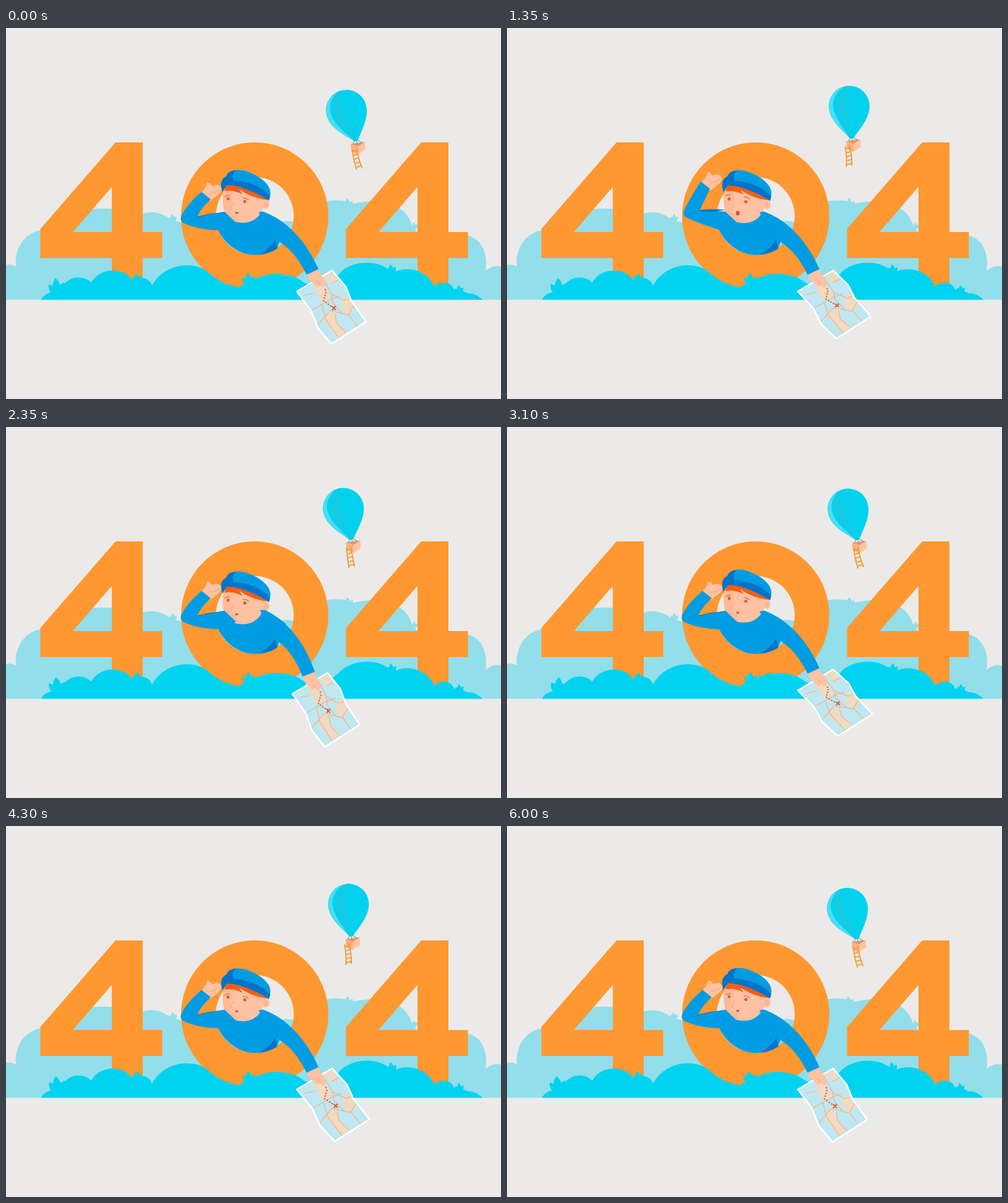
Recreate the animation shown at these times as an HTML page. Size 800 by 600 pixels, loop 6100 ms.

```html
<!DOCTYPE html>
<html lang="en">
<head>
<meta charset="utf-8">
<title>404</title>
<style>
  html, body { margin: 0; width: 100%; height: 100%; overflow: hidden; background: #ebeae8; }
  svg { display: block; width: 100vw; height: 100vh; }
  .back { fill: #92deea; }
  .front { fill: #00d3f0; }
  .digit { fill: #ff9831; }
  .shirt { fill: #009ce3; }
  .navy { fill: #0074c8; }
  .skin { fill: #ffc2a3; }
  .shade { fill: #fdb290; }
  .line { fill: none; stroke-linecap: round; stroke-linejoin: round; }
</style>
</head>
<body>
<svg viewBox="0 0 800 600">
  <defs>
    <path id="leaf" d="M0 0C-9 -9 -7 -19 -1 -26C7 -18 8 -9 0 0Z"/>
    <g id="tuft">
      <use href="#leaf"/>
      <use href="#leaf" transform="rotate(-32) scale(.8)"/>
      <use href="#leaf" transform="rotate(34) scale(.85)"/>
    </g>
    <path id="four" d="M177 185H221V330H252.500V372H221V425H171V372H55.500V325ZM171 257L108 330H171Z" fill-rule="evenodd"/>
    <path id="mapEdge" d="M470 426L527 392L549 418L558 441L582 475L526 511L504 485L493 457Z"/>
  </defs>

  <g class="back">
    <path d="M0 439.500V383Q9 381 16 386C13 355 32 328 61 327C82 306 110 292 155 292
      Q188 291 215 303C229 295 252 296 268 312Q290 312 310 330H425C432 311 457 307 474 318
      C482 295 506 277 537 279Q550 279 562 284C608 273 650 286 657 323Q662 326 668 335H745
      C770 341 779 366 775 393Q787 382 800 386V439.500Z"/>
    <use href="#tuft" transform="translate(270 314) scale(.5)"/>
    <use href="#tuft" transform="translate(553 292) scale(.65)"/>
    <use href="#tuft" transform="translate(660 326) scale(.45)"/>
  </g>

  <g class="digit">
    <use href="#four"/>
    <use href="#four" x="494"/>
    <path d="M402 185A119 119.500 0 1 1 401.900 185ZM402 241A63 63 0 1 0 402.100 241Z" fill-rule="evenodd"/>
  </g>

  <g class="front">
    <path d="M57 439.500C61 429 75 425 89 428C92 402 124 397 138 412C150 387 191 386 204 408
      C216 399 234 405 236 417C255 379 308 375 330 398Q350 415 376 419Q388 412 402 407
      C422 393 463 395 482 412L500 418Q515 414 537 399C556 374 606 373 624 396
      C650 383 682 393 692 418C702 408 720 410 724 423Q740 425 746 429Q760 429 770 439.500Z"/>
    <use href="#tuft" transform="translate(83 433) scale(1.1)"/>
    <use href="#tuft" transform="translate(212 412) scale(.6)"/>
    <use href="#tuft" transform="translate(393 418) scale(.85)"/>
    <use href="#tuft" transform="translate(623 399) scale(.65)"/>
    <use href="#tuft" transform="translate(733 430) scale(.55)"/>
  </g>

  <g id="balloon">
    <g id="bag">
      <path d="M-3 0C-11 -11 -33 -30 -33 -52A33 33 0 0 1 33 -52C33 -30 11 -11 3 0Z" fill="#00d2ef"/>
      <path d="M-2 0C-9 -14 -20 -33 -20 -55Q-17 -78 0 -85Q16 -77 17 -54C17 -32 6 -14 1 0Z" fill="#16cae4"/>
      <path d="M-1 0C-4 -18 -7 -36 -6 -55Q-5 -76 0 -85Q16 -77 17 -54C17 -32 6 -14 1 0Z" fill="#05d0ec"/>
      <path d="M-3 0C-11 -11 -33 -30 -33 -52Q-32 -78 -4 -84.500Q-25 -75 -26 -54C-25 -32 -9 -14 -3 0Z" fill="#48dff2"/>
    </g>
    <path class="line" d="M-2 -1L-7 7M0 -1L2 10M2 -1L12 4" stroke="#16abc9" stroke-width="1"/>
    <path d="M-9 5L3 3L14 2L3 9Z" fill="#e9935f"/>
    <path d="M-9 5L3 9V22L-8 18Z" fill="#fbb183"/>
    <path d="M3 9L14 2L15 14L3 22Z" fill="#ffc5a2"/>
    <path id="ladder" class="line" stroke="#f6962f" stroke-width="1.800"/>
  </g>

  <path class="shirt" d="M346 298L415 297Q437 305 452 318L438 357Q422 367 402 367C373 367 349 344 341 322Z"/>
  <path class="navy" d="M435 342L438 357Q426 365 409 366.500Q426 358 435 342Z"/>

  <g id="head">
    <ellipse class="skin" cx="420" cy="285" rx="6" ry="8"/>
    <path class="skin" d="M351 265C348 298 357 315 383 315C403 315 417 300 418 278V266L355 253Z"/>
    <path class="shade" d="M351 265C348 294 355 311 374 314Q375 305 371 301Q358 300 362 289Q368 278 365 261Z" opacity=".55"/>
    <ellipse class="shade" cx="420" cy="286" rx="3" ry="4.500"/>
    <path d="M353 264L357 248L426 268L421 278Q397 275 377 261L382 269Q367 261 353 264Z" fill="#fa5d12"/>
    <path class="shirt" d="M350 265C345 250 349 243 356 240C360 228 378 227 392 233C414 241 430 256 427 270L425 279C405 266 377 254 357 254Z"/>
    <path class="navy" d="M350 265C345 250 349 243 356 240Q359 230 372 230Q363 238 368 247C391 247 415 258 427 272L425 279C405 266 377 254 357 254Z"/>
    <g fill="#cb6531"><ellipse cx="359" cy="276" rx="2.300" ry="2.600"/><ellipse cx="386" cy="280.500" rx="2.500" ry="2.600"/></g>
    <path id="brows" class="line" d="M354 273Q357 270 361 271M383 275Q388 274 392 278" stroke="#e77a3d" stroke-width="1.500"/>
    <path class="line" d="M368 283L363 291Q363 294 366 294" stroke="#f7a782" stroke-width="1.300"/>
    <ellipse id="mouth" cx="373" cy="299" fill="#d4552a"/>
  </g>

  <g id="saluteHand">
    <path class="skin" d="M315 267C321 260 324 256 325 250Q330 249 333 256C341 251 349 255 348 262C346 270 338 272 330 280Z"/>
    <path class="line" d="M330 267Q338 267 345 261" stroke="#f9ab87" stroke-width="1.500"/>
  </g>
  <path id="salute" class="shirt"/>
  <path id="fold" class="navy"/>

  <g id="map">
    <use href="#mapEdge" fill="#bfe7f1"/>
    <path d="M497 418L510 407L521 428L526 438L508 442ZM513 401L526 394L536 407L526 413ZM541 440L556 435L563 454L553 464L544 457ZM512 469L524 457L533 464L534 476L550 492L536 501Z" fill="#eedbc2"/>
    <path class="line" d="M483 432L497 429M493 457L526 438L541 433M511 402L526 430L546 441L557 437M526 413L538 407M526 430L528 444L543 462L554 464L568 483M504 480L524 457L553 464L562 449M511 448L516 470L538 502M532 463L534 477L549 492" stroke="#fbae85" stroke-width="1.200"/>
    <path class="line" d="M516 423L517 428L513 441L528 452" stroke="#e9602a" stroke-width="2.300" stroke-dasharray=".5 4.200"/>
    <path class="line" d="M527.500 450.500L532.500 455.500M532.500 450.500L527.500 455.500" stroke="#e9501c" stroke-width="2"/>
    <use href="#mapEdge" class="line" stroke="#fff" stroke-width="2.500"/>
  </g>

  <g id="arm">
    <path class="skin" d="M486 394L504 388C506 399 515 402 516 411Q517 418 512 420L508 415Q504 422 499 416C495 409 487 411 486 394Z"/>
    <path class="line" d="M502 409L508 415" stroke="#f9ab87" stroke-width="1.300"/>
    <path class="shirt" d="M408 298L416 297C456 313 486 346 505 390L486 399C473 373 456 351 432 341Z"/>
  </g>
</svg>
<script>
const LOOP = 6100, HOLD = 6000, STEP = 50;
const $ = id => document.getElementById(id);
const set = (id, name, value) => $(id).setAttribute(name, value);
const move = (id, value) => set(id, 'transform', value);
const mix = (a, b, k) => a + (b - a) * k;

// Endless swing, 1 at the peak
const wave = (t, peak, period = 3) => Math.cos((t - peak) * 2 * Math.PI / period);

// Single smooth rise and fall from 0 to 1 to 0
const bump = (t, peak, reach) =>
  Math.abs(t - peak) < reach ? (1 + Math.cos(Math.PI * (t - peak) / reach)) / 2 : 0;

function drawBalloon(t) {
  move('balloon', `translate(${561 + 6.2 * wave(t, .29)} ${180.4 + 2.2 * wave(t, 2.8)})`);
  move('bag', `rotate(${-11.5 - 6.8 * wave(t, 2.85)})`);

  const swing = wave(t, .1);
  const at = (k, side) => {
    const x = mix(-5 + 2.5 * swing, 5 * swing, k) - 5 * swing * k * (1 - k);
    return `${x + side * (3.5 + k)} ${13 + 32 * k - side}`;
  };
  const rail = side => 'M' + [0, .25, .5, .75, 1].map(k => at(k, side)).join('L');
  let d = rail(-1) + rail(1);
  for (let k = .1; k < 1; k += .2) d += `M${at(k, -1)}L${at(k, 1)}`;
  set('ladder', 'd', d);
}

function drawBoy(t, dip) {
  move('head', `translate(0 ${.6 * (1 - wave(t, 0, 6)) + 3 * dip})`);

  const alarm = Math.min(1, 1.6 * bump(t, 1.25, .65));
  move('brows', `translate(0 ${-2 * alarm})`);
  set('mouth', 'rx', 2.6 + .4 * alarm);
  set('mouth', 'ry', 1.8 + 2 * alarm);
  move('saluteHand', `translate(${-alarm} ${-17 * alarm})`);

  // Elbow, cuff and inner fold of the saluting arm
  const ex = 283 + 3 * alarm, ey = 309 - 9 * alarm;
  const cx = 316 - 3 * alarm, cy = 265 - 17 * alarm;
  const fx = 309 + 3 * alarm, fy = 305 - 11 * alarm;
  set('salute', 'd', `M${cx} ${cy}L${cx + 15} ${cy + 12}Q${fx + 7} ${fy - 15} ${fx} ${fy}
    L353 297L372 315L346 327Q${ex + 28} ${ey + 18} ${ex + 3} ${ey + 6}
    Q${ex - 2} ${ey + 3} ${ex} ${ey - 5}Q${ex + 10} ${ey - 25} ${cx} ${cy}Z`);
  set('fold', 'd', `M${fx} ${fy}L${fx + 22} ${300 - 7 * alarm}L354 ${299 - 5 * alarm}
    Q330 ${300 - alarm} ${fx - 1} ${fy + 2}Z`);
}

function drawArm(t, dip) {
  const gesture = bump(t, 1, .33) + bump(t, 3.6, .33);
  const lift = bump(t, 1.5, .5) + bump(t, 3.05, .45);
  const turn = 12 * gesture + 5 * dip, drop = 15 * gesture;
  move('arm', `translate(0 ${drop}) rotate(${turn} 432 325)`);

  // The map follows the hand, which hangs 68, 80 from the shoulder
  const a = turn * Math.PI / 180, c = Math.cos(a), s = Math.sin(a);
  const hx = 68 * c - 80 * s - 68, hy = 68 * s + 80 * c - 80 + drop;

  // Its top edge stays in the hand while the lower edge swings
  const dx = 7 * Math.sin(Math.PI * t / 6) + 2 * lift - 10 * dip - 6 * gesture;
  const dy = 5 * gesture - 10 * lift + 2 * dip - .7 * (1 - wave(t, 0, 6));
  const u = .00504, v = .00845;
  move('map', `translate(${470 + hx} ${426 + hy})
    matrix(${1 + u * dx} ${u * dy} ${v * dx} ${1 + v * dy} 0 0) translate(-470 -426)`);
}

function draw(now) {
  const ms = Math.floor(now % LOOP / STEP) * STEP;
  const t = Math.min(ms, HOLD) / 1000;
  const dip = bump(t, 2.35, .7);
  drawBalloon(t);
  drawBoy(t, dip);
  drawArm(t, dip);
  move('tuft', `rotate(${-4 * wave(t, 0, 2)})`);
}

const start = performance.now();
(function tick() {
  draw(performance.now() - start);
  requestAnimationFrame(tick);
})();
</script>
</body>
</html>
```
